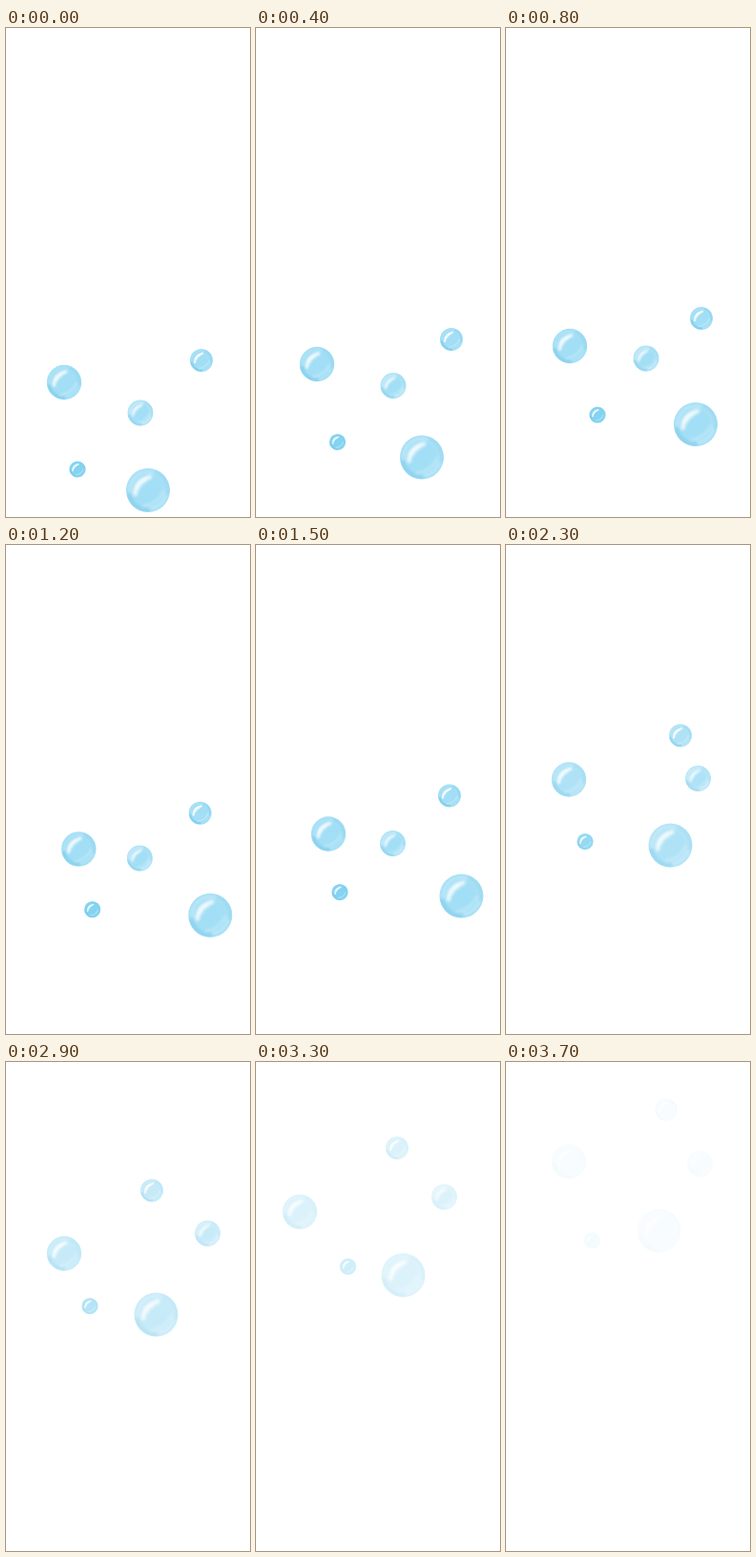
An HTML page for the animation above (3.9 s loop, 256 by 512 pixels).

```html
<!DOCTYPE html>
<html lang="en">
<head>
<meta charset="utf-8">
<title>Bubbles</title>
<style>
  html, body { margin: 0; width: 100%; height: 100%; overflow: hidden; background: #fff; }
  svg { display: block; width: 256px; height: 512px; }
</style>
</head>
<body>
<svg id="stage" viewBox="0 0 256 512" fill="none" stroke-linecap="round">
  <defs>
    <clipPath id="round"><circle r="100"/></clipPath>
    <filter id="soft" x="-50%" y="-50%" width="200%" height="200%">
      <feGaussianBlur stdDeviation="6"/>
    </filter>
  </defs>
</svg>
<script>
const STEP = 100, LOOP = 3900, LAST = 3700;
const FIRST = 800, LEG = 600;          // a long first leg, then equal ones
const FADE_FROM = 1400, FADE_TO = 3800;

// r: radius, ring: strength of the pale inner rim, path: turning points
const bubbles = [
  { r: 18.2, ring: 0.2, tone: "#a2def5",
    path: [[61, 371], [67, 333], [81, 311], [51, 260], [81, 231], [41, 170], [71, 91]] },
  { r: 13.4, ring: 0.7, tone: "#a2def5",
    path: [[141, 403], [147, 346], [137, 319], [176, 280], [227, 209], [196, 150], [205, 98]] },
  { r: 12, ring: 0.1, tone: "#a2def5",
    path: [[205, 348], [205, 304], [203, 269], [203, 230], [163, 169], [143, 100], [173, 40]] },
  { r: 8.6, ring: 0, tone: "#84d3f0",
    path: [[75, 462], [96, 405], [88, 370], [88, 331], [78, 290], [98, 221], [89, 180]] },
  { r: 23, ring: 0.4, tone: "#a2def5",
    path: [[149, 484], [199, 415], [222, 374], [183, 335], [162, 294], [153, 235], [162, 165]] }
];

const art = b => `
  <circle r="100" fill="${b.tone}"/>
  <g clip-path="url(#round)"><g filter="url(#soft)">
    <circle r="84" stroke="#e0f5fd" stroke-width="16" opacity="${b.ring}"/>
    <path d="M-86 20A88 88 0 0 0 0 88" stroke="#76c8ea" stroke-width="20" opacity=".65"/>
    <path d="M34 -80A88 88 0 0 1 86 16" stroke="#80cdec" stroke-width="14" opacity=".5"/>
    <path d="M-20 72Q46 60 70 4" stroke="#d3f0fb" stroke-width="14" opacity=".45"/>
    <path d="M-58 16Q-58 -44 8 -60" stroke="#fff" stroke-width="20" opacity=".8"/>
    <path d="M-44 -12Q-34 -36 -14 -44" stroke="#fff" stroke-width="20" opacity=".5"/>
  </g></g>`;

const stage = document.getElementById("stage");
for (const b of bubbles) {
  b.node = document.createElementNS("http://www.w3.org/2000/svg", "g");
  b.node.innerHTML = art(b);
  stage.append(b.node);
}

function place(path, t) {
  const s = t < FIRST ? t / FIRST : 1 + (t - FIRST) / LEG;
  const i = Math.floor(s);
  return path[i].map((v, axis) => v + (path[i + 1][axis] - v) * (s - i));
}

function draw(now) {
  const t = Math.min(Math.floor((now % LOOP) / STEP) * STEP, LAST);
  const gone = Math.max(0, (t - FADE_FROM) / (FADE_TO - FADE_FROM));
  stage.setAttribute("opacity", 1 - gone ** 2);
  for (const b of bubbles) {
    b.node.setAttribute("transform", `translate(${place(b.path, t)}) scale(${b.r / 100})`);
  }
}

const start = performance.now();
function tick() {
  draw(performance.now() - start);
  requestAnimationFrame(tick);
}
tick();
</script>
</body>
</html>
```
